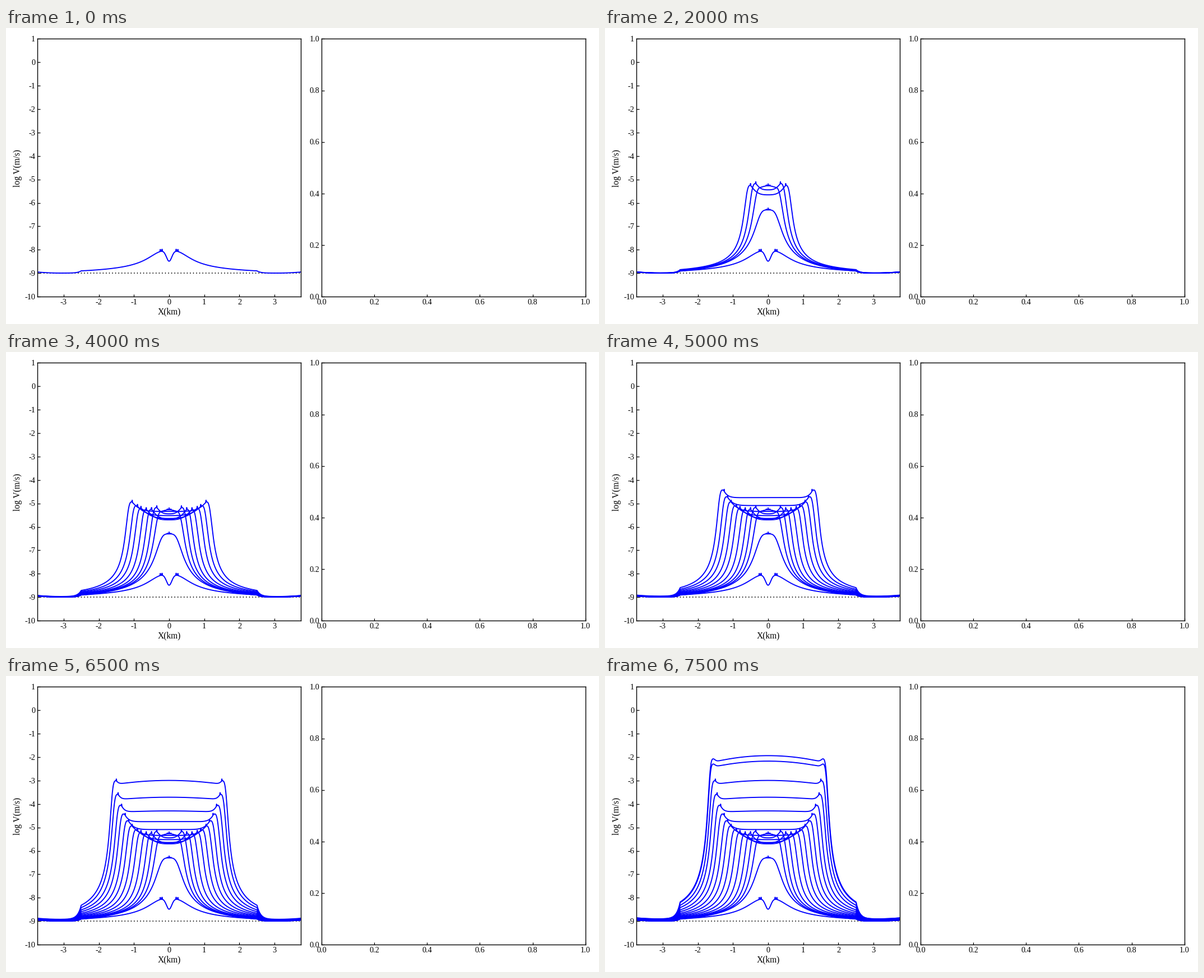
A matplotlib script that plays this animation: 1058 px wide and 529 px high, repeating every 8 s.

```python
import numpy as np
import matplotlib.pyplot as plt
from matplotlib.animation import FuncAnimation

W, H, DPI = 1058, 529, 100
PX = 72 / DPI
TOP, BOTTOM = 19.4, 480
plt.rcParams["font.family"] = "Liberation Serif"
plt.rcParams["axes.unicode_minus"] = False
plt.rcParams["lines.scale_dashes"] = False

FLOOR, EDGE, STEP, COUNT = -9, 2.5, 0.0125, 16
N = 300
X = np.arange(-N, N + 1) * STEP
R = np.abs(X)

# soft kernel that rounds the crests
KERNEL = np.exp(-0.5 * (np.arange(-8, 9) / 2.4) ** 2)
KERNEL /= KERNEL.sum()


def decay(d, k, reach, n):
    """Share of the height left at distance d: flat top, then a k/d tail."""
    d = np.maximum(d, 1e-3)
    tail = np.maximum(k / d - k / reach, 1e-3)
    return (1 + tail ** -n) ** (-1 / n)


def through(keys, values):
    """Polynomial through a few key points."""
    return np.poly1d(np.polyfit(keys, values, len(keys) - 1))


KEYS = [3, 5, 7, 10, 12, 14]
crest_at = through(KEYS, [-5.16, -5.24, -5.08, -4.40, -3.57, -2.28])
middle_at = through(KEYS, [-5.445, -5.70, -5.52, -4.75, -3.71, -2.17])


def front_at(t):
    return np.interp(t, [2, 6, 8, 10, 12, 13, 14], [0.2, 0.8, 1.06, 1.28, 1.45, 1.5, 1.535])


def patch(a, crest, middle, power):
    """Slipping patch of half width a with a tail on both sides."""
    k = 0.13 + 0.18 * np.exp(-a / 0.15)
    height = crest - FLOOR
    v = FLOOR + height * decay(R - a, k, 3.4 + 2.8 * a, max(4, height))
    if a > 0:
        sag = 0.11 * max(0, crest + 4.5)
        u = np.minimum(R / a, 1)
        inner = middle - sag * u ** 2 + (crest - middle + sag) * u ** power
        v = np.where(R < a, inner, v)
    return v


def add_edges(v):
    """Beyond EDGE the rate drops to a low wing that lifts with the tail."""
    rest = v[N + int(EDGE / STEP)] - FLOOR
    wing = 0.13 * (rest - 0.08)
    out = FLOOR + wing + (rest - wing) * np.exp(-(R - EDGE) / 0.1)
    out += 0.045 * (np.maximum(R - 3.05, 0) / 0.7) ** 2
    return np.where(R > EDGE, out, v)


def profile(i):
    if i == 0:
        v = FLOOR + 0.97 * decay(R, 0.5, 5, 3) - 0.5 * np.exp(-(R / 0.1) ** 2)
        spikes = {0.2: 0.09, 0.25: 0.09}
    elif i == 1:
        v = patch(0, -6.3, -6.3, 1)
        spikes = {0: 0.08, 0.05: 0.03}
    elif i == 2:
        v = patch(0.2, -5.34, -5.27, 2)
        spikes = {0: 0.08, 0.05: 0.04}
    else:
        t = min(i, 14 + 0.27 * (i - 14)) if i > 14 else i
        a = front_at(t)
        v = patch(a, crest_at(t), middle_at(t), 3 + 0.55 * max(0, t - 6) ** 2)
        spikes = {0.05 * round((a - 0.01) / 0.05): 0.09} if i < 14 else {}
    pad = len(KERNEL) // 2
    v = np.convolve(np.pad(v, pad, mode="edge"), KERNEL, mode="valid")
    v = add_edges(v)
    for pos, height in spikes.items():
        k = round(pos / STEP)
        v[list({N - k, N + k})] += height
    return v


fig = plt.figure(figsize=(W / DPI, H / DPI), dpi=DPI, facecolor="white")


def label(x, y, s, size=14.2, **kw):
    fig.text(x / W, 1 - y / H, s, fontsize=size * PX, **kw)


def panel(left, right, xlim, ylim, xticks, yticks, fmt):
    ax = fig.add_axes([left / W, 1 - BOTTOM / H, (right - left) / W, (BOTTOM - TOP) / H])
    ax.set(xlim=xlim, ylim=ylim, xticks=xticks, yticks=yticks)
    ax.tick_params(direction="in", length=4.5 * PX, width=1.3 * PX,
                   labelbottom=False, labelleft=False)
    for s in ax.spines.values():
        s.set_linewidth(1.4 * PX)
    for t in xticks:
        px = left + (t - xlim[0]) / (xlim[1] - xlim[0]) * (right - left)
        label(px, 493.6, fmt % t, ha="center", va="baseline")
    for t in yticks:
        py = BOTTOM - (t - ylim[0]) / (ylim[1] - ylim[0]) * (BOTTOM - TOP)
        label(left - 3.5, py + 4.8, fmt % t, ha="right", va="baseline")
    return ax


ax = panel(55.7, 526.3, (-3.75, 3.75), (-10, 1), range(-3, 4), range(-10, 2), "%d")
fifths = np.arange(6) / 5
panel(563, 1033.7, (0, 1), (0, 1), fifths, fifths, "%.1f")
label(291, 511, "X(km)", 15.5, ha="center", va="baseline")
label(29.5, 250, "log V(m/s)", 15.5, ha="right", va="center", rotation=90)

ax.axhline(FLOOR, color="black", lw=1.9 * PX, ls=(0, (1, 3)), zorder=1)
lines = [ax.plot(X, profile(i), color="#0000ff", lw=1.9 * PX)[0] for i in range(COUNT)]


def draw(i):
    for k, line in enumerate(lines):
        line.set_visible(k <= i)
    return lines


anim = FuncAnimation(fig, draw, frames=COUNT, interval=500,
                     init_func=lambda: draw(0), repeat=True, repeat_delay=0)
plt.show()
```
